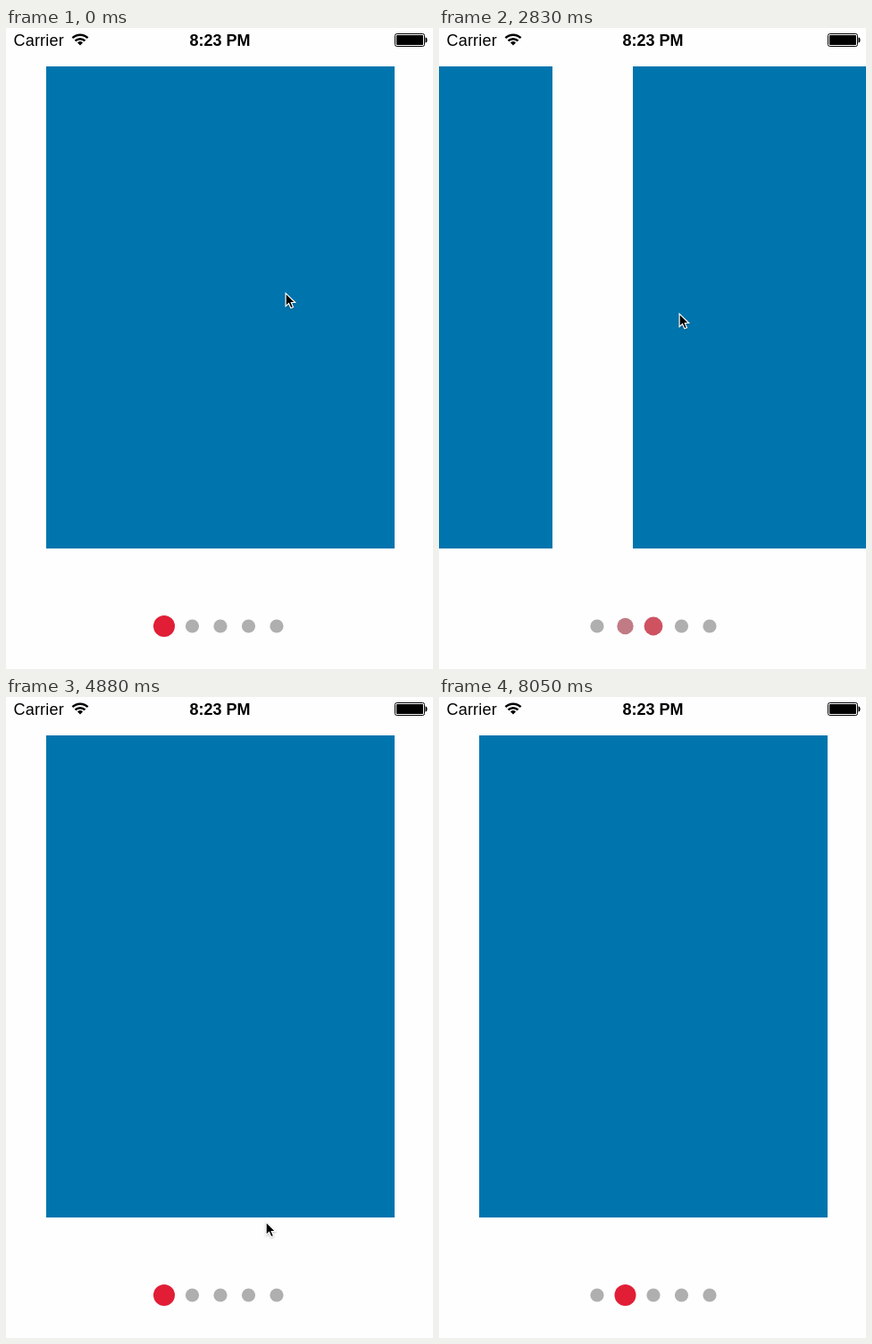
An HTML page for the animation above (8430 ms loop, 478 by 718 pixels).

```html
<!DOCTYPE html>
<html lang="en">
<head>
<meta charset="utf-8">
<title>Paged carousel</title>
<style>
  html, body { margin: 0; width: 100%; height: 100%; overflow: hidden; background: #fefefe; }
  svg { display: block; width: 478px; height: 718px; }
  text { font: 18px "Liberation Sans", Arial, sans-serif; fill: #000; }
</style>
</head>
<body>
<svg viewBox="0 0 478 718">
  <rect width="478" height="718" fill="#fefefe"/>
  <g id="panels" fill="#0075ad"></g>
  <g id="dots"></g>
  <text x="8.5" y="20" letter-spacing=".2">Carrier</text>
  <text x="205.5" y="20" font-weight="bold" style="font-weight:bold">8:23 PM</text>
  <g fill="none" stroke="#000" stroke-width="2.4">
    <path d="M74.4 11.2A12.4 12.4 0 0 1 91.6 11.2"/>
    <path d="M77.5 14.4A8 8 0 0 1 88.5 14.4"/>
    <path d="M83 19.6L80 16.5A4.4 4.4 0 0 1 86 16.5Z" fill="#000" stroke="none"/>
  </g>
  <rect x="435.5" y="6.5" width="33" height="14" rx="2" fill="none" stroke="#000"/>
  <rect x="437" y="8" width="30" height="11" rx=".8"/>
  <path d="M469.5 10.5q2 0 2 3t-2 3z"/>
  <path id="cursor" d="M.6 .6V15.2L4 12L6.3 17.3L9 16.1L6.8 11H11.2Z"
        stroke="#fff" stroke-width="1.2" style="filter:drop-shadow(0 1px 1px rgba(0,0,0,.25))"/>
</svg>
<script>
const LOOP = 8430, PAGE = 480, COUNT = 5;
const GRAY = [175, 175, 175], RED = [225, 30, 54];

// Pointer stops: time, x, y, optional power for the easing into the stop.
const stops = [
  [0, 313, 297], [30, 313, 297], [490, 337, 291], [650, 337, 291],
  [830, 165, 305, 1.3], [950, 152, 306], [1300, 300, 318], [1430, 300, 318],
  [1590, 145, 322, 1.3], [1810, 132, 321], [2260, 98, 313], [2290, 97, 312],
  [2460, 97, 312], [2921, 288, 321], [3300, 288, 321], [3550, 175, 318],
  [3940, 175, 318], [4330, 295, 318, 1.37], [4450, 308, 324], [4800, 295, 571, 1],
  [5120, 270, 676], [5280, 272, 668], [6590, 272, 668], [6860, 180, 675],
  [7040, 180, 672], [7070, 180, 671], [7520, 180, 671], [8045, 350, 722, 1.5]
];

// Swipes follow the pointer until release, then settle like a damped spring.
const moves = [
  { start: 650, release: 830, from: 0, to: 1, rate: .03 },
  { start: 1430, release: 1590, from: 1, to: 2, rate: .0334 },
  { start: 2460, release: 2921, from: 2, to: 1, rate: .0124 },
  { start: 3940, release: 4330, from: 1, to: 0, rate: .018 },
  { start: 5415, from: 0, to: 1 },
  { start: 6160, from: 1, to: 2 },
  { start: 7283, from: 2, to: 1 }
];
const TAP_TIME = 310;

const mix = (a, b, u) => a + (b - a) * u;
const smooth = u => u * u * (3 - 2 * u);

function pointerAt(t) {
  const i = stops.findIndex(s => s[0] > t);
  if (i < 0) return stops[stops.length - 1].slice(1, 3);
  const [t0, x0, y0] = stops[i - 1], [t1, x1, y1, power] = stops[i];
  const u = (t - t0) / (t1 - t0), e = power ? u ** power : smooth(u);
  return [mix(x0, x1, e), mix(y0, y1, e)];
}

function pageAt(t) {
  const move = moves.filter(m => m.start <= t).pop();
  if (!move) return 0;
  const { start, release, from, to, rate } = move;
  if (!release) {
    const u = Math.min(1, (t - start) / TAP_TIME);
    return mix(from, to, (1 - Math.cos(Math.PI * u)) / 2);
  }
  const dragged = from + (pointerAt(start)[0] - pointerAt(Math.min(t, release))[0]) / PAGE;
  if (t < release) return dragged;
  const k = rate * (t - release);
  const left = (dragged - to) * (1 + k) * Math.exp(-k);
  return Math.abs(left) * PAGE < .5 ? to : to + left;
}

function add(parent, tag, attrs) {
  const el = document.createElementNS("http://www.w3.org/2000/svg", tag);
  for (const key in attrs) el.setAttribute(key, attrs[key]);
  return document.getElementById(parent).appendChild(el);
}

const panels = [], dots = [];
for (let i = 0; i < COUNT; i++) {
  panels.push(add("panels", "rect", { y: 43, width: 390, height: 540 }));
  dots.push(add("dots", "circle", { cx: 177 + 31.5 * i, cy: 670 }));
}
const cursor = document.getElementById("cursor");

function draw(t) {
  const page = pageAt(t);
  for (let i = 0; i < COUNT; i++) {
    const active = Math.max(0, 1 - Math.abs(i - page));
    panels[i].setAttribute("x", Math.round(45 + PAGE * (i - page)));
    dots[i].setAttribute("r", mix(7.6, 12, active));
    dots[i].setAttribute("fill", `rgb(${GRAY.map((g, c) => Math.round(mix(g, RED[c], active)))})`);
  }
  const [x, y] = pointerAt(t).map(Math.round);
  cursor.setAttribute("transform", `translate(${x - .5} ${y - .5})`);
}

const began = performance.now();
function tick() {
  draw((performance.now() - began) % LOOP);
  requestAnimationFrame(tick);
}
tick();
</script>
</body>
</html>
```
